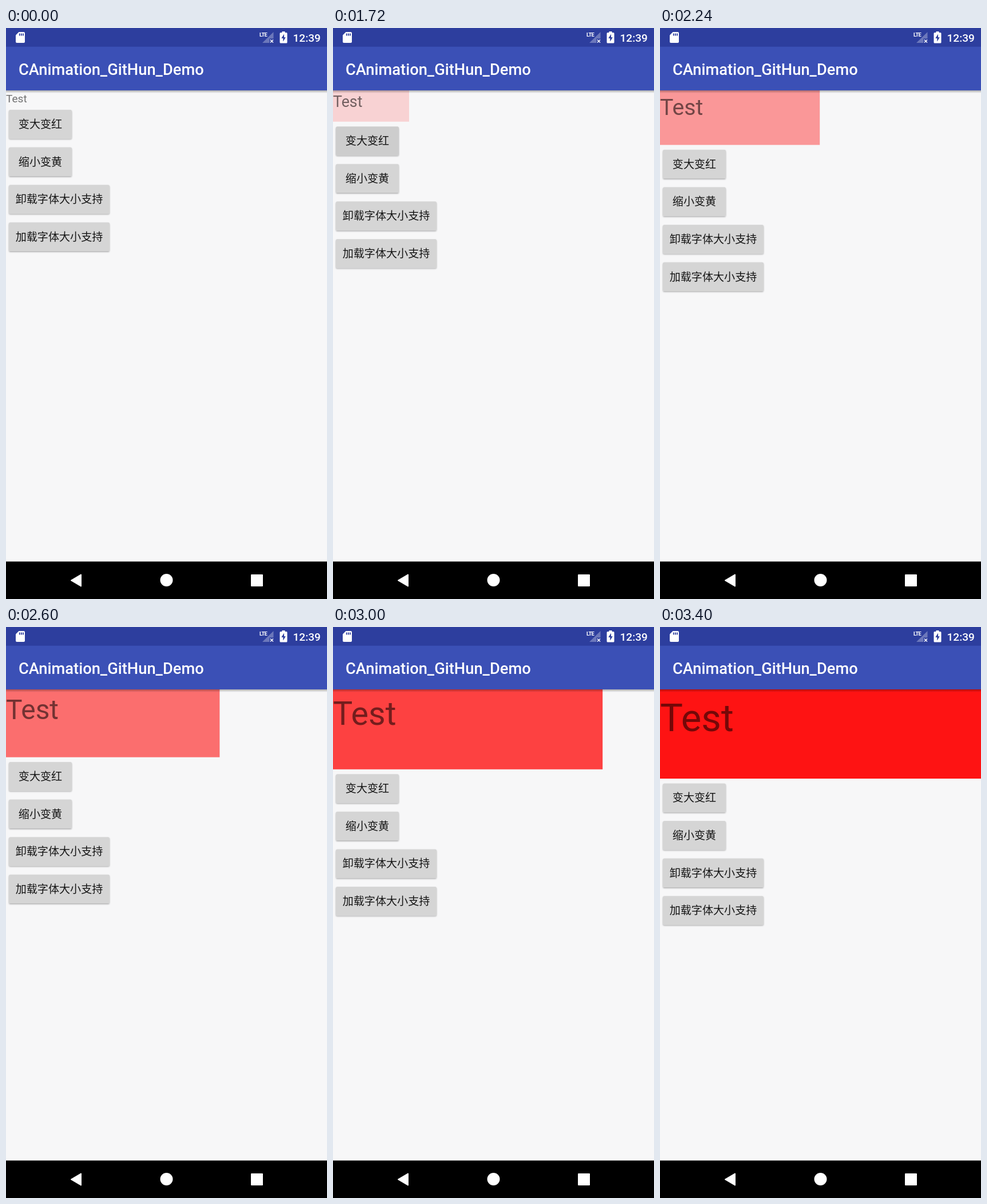
Write an HTML page that moves like this. It is 561 by 998 pixels and loops after 3440 ms.

```html
<!DOCTYPE html>
<html lang="zh-CN">
<head>
<meta charset="utf-8">
<style>
  html, body { margin: 0; width: 100%; height: 100%; overflow: hidden; background: #f7f7f8; }
  svg { display: block; width: 561px; height: 998px; }
  text { font-family: Roboto, sans-serif; }
  .label { font: 19.1px "Noto Sans CJK SC", "Noto Sans CJK", sans-serif; fill: #151515; text-anchor: middle; }
  .lte { font-size: 9.4px; font-weight: 700; font-stretch: 75%; letter-spacing: -.7px; }
</style>
</head>
<body>
<svg viewBox="0 0 561 998">
  <defs>
    <filter id="drop" x="-10%" y="-20%" width="120%" height="150%">
      <feDropShadow dx="0" dy="1.4" stdDeviation="1.2" flood-color="#000" flood-opacity=".32"/>
    </filter>
    <linearGradient id="fade" x1="0" y1="0" x2="0" y2="1">
      <stop offset="0" stop-color="#000" stop-opacity=".3"/>
      <stop offset="1" stop-color="#000" stop-opacity="0"/>
    </linearGradient>
  </defs>
  <rect width="561" height="998" fill="#f7f7f8"/>
  <rect id="box" y="109" fill="#f00"/>
  <text id="test" fill="#000" fill-opacity=".54">Test</text>
  <g id="buttons"></g>

  <rect y="109" width="561" height="5" fill="url(#fade)"/>
  <rect y="32" width="561" height="77" fill="#3b50b6"/>
  <rect width="561" height="32.7" fill="#2d3e9e"/>
  <text x="22" y="81.5" font-size="27.3" font-weight="500" fill="#fff">CAnimation_GitHun_Demo</text>

  <g fill="#fff">
    <path d="M22.5 7H31Q33 7 33 9V24Q33 26 31 26H19Q17 26 17 24V12.5Z"/>
    <path d="M23.8 9.5v4M26.9 9.5v4M30 9.5v4" stroke="#2d3e9e" stroke-width="1.8"/>
    <text class="lte" x="443" y="15">LTE</text>
    <path d="M448 26L467.5 7V18.5H460.5V26Z" fill="#6c78bb"/>
    <path d="M462 20.5l5 5m0-5l-5 5" stroke="#fff" stroke-width="1.5"/>
    <path d="M482.5 8V6H487.5V8H490Q491.5 8 491.5 9.5V25Q491.5 26.5 490 26.5H480Q478.500 26.5 478.5 25V9.500Q478.5 8 480 8Z"/>
    <path d="M486 10.500L481.300 18H484.300V23.800L488.800 16.200H486Z" fill="#2d3e9e"/>
    <text x="501.500" y="24" font-size="19.1" font-weight="500">12:39</text>
  </g>

  <rect y="932.5" width="561" height="66" fill="#000"/>
  <g fill="#fff" stroke="#fff" stroke-linejoin="round" stroke-width="2">
    <path d="M114 965.500L131 955.500V975.500Z"/>
    <circle cx="280.500" cy="965" r="10"/>
    <rect x="429" y="956" width="19" height="19"/>
  </g>
</svg>
<script>
const LOOP = 3440, START = 1400, PRESS = 1320;
const HOLDS = [[1320, 1440], [1440, 1600], [1720, 1880]];
const $ = id => document.getElementById(id);
const set = (el, attrs) => { for (const k in attrs) el.setAttribute(k, attrs[k]); };
const box = $('box'), test = $('test'), buttons = $('buttons');

buttons.innerHTML = ['变大变红', '缩小变黄', '卸载字体大小支持', '加载字体大小支持'].map((label, i) => {
  const w = label.length > 4 ? 176 : 110, y = 143 + i * 65.6;
  const rect = `x="5" y="${y}" width="${w}" height="50.3" rx="2.5"`;
  return `<rect ${rect} fill="#d5d5d5" filter="url(#drop)"/>` +
    (i ? '' : `<rect id="tint" ${rect}/>`) +
    `<text class="label" x="${5 + w / 2}" y="${y + 32}">${label}</text>`;
}).join('');

// The picture advances in 40 ms ticks, with a few longer pauses.
function tick(t) {
  const hold = HOLDS.find(([a, b]) => t >= a && t < b);
  return hold ? hold[0] : Math.floor(t / 40) * 40;
}

function draw(time) {
  const t = tick(time), d = Math.max(0, t - START);
  const grow = .096 * d - 1.54e-5 * d * d;
  const size = 19.1 + .024 * d;
  set(box, {
    width: 37 + .3072 * d - 2.24e-5 * d * d,
    height: 25.6 + grow,
    'fill-opacity': .00046 * d
  });
  set(test, { y: 109 + 1.085 * size, 'font-size': size });
  set(buttons, { transform: `translate(0 ${grow})` });
  const fade = Math.min(1, Math.max(0, 1 - (t - 1440) / 560));
  set($('tint'), { 'fill-opacity': t < PRESS ? 0 : .08 * fade });
}

const begin = performance.now();
function frame() {
  draw((performance.now() - begin) % LOOP);
  requestAnimationFrame(frame);
}
frame();
</script>
</body>
</html>
```
